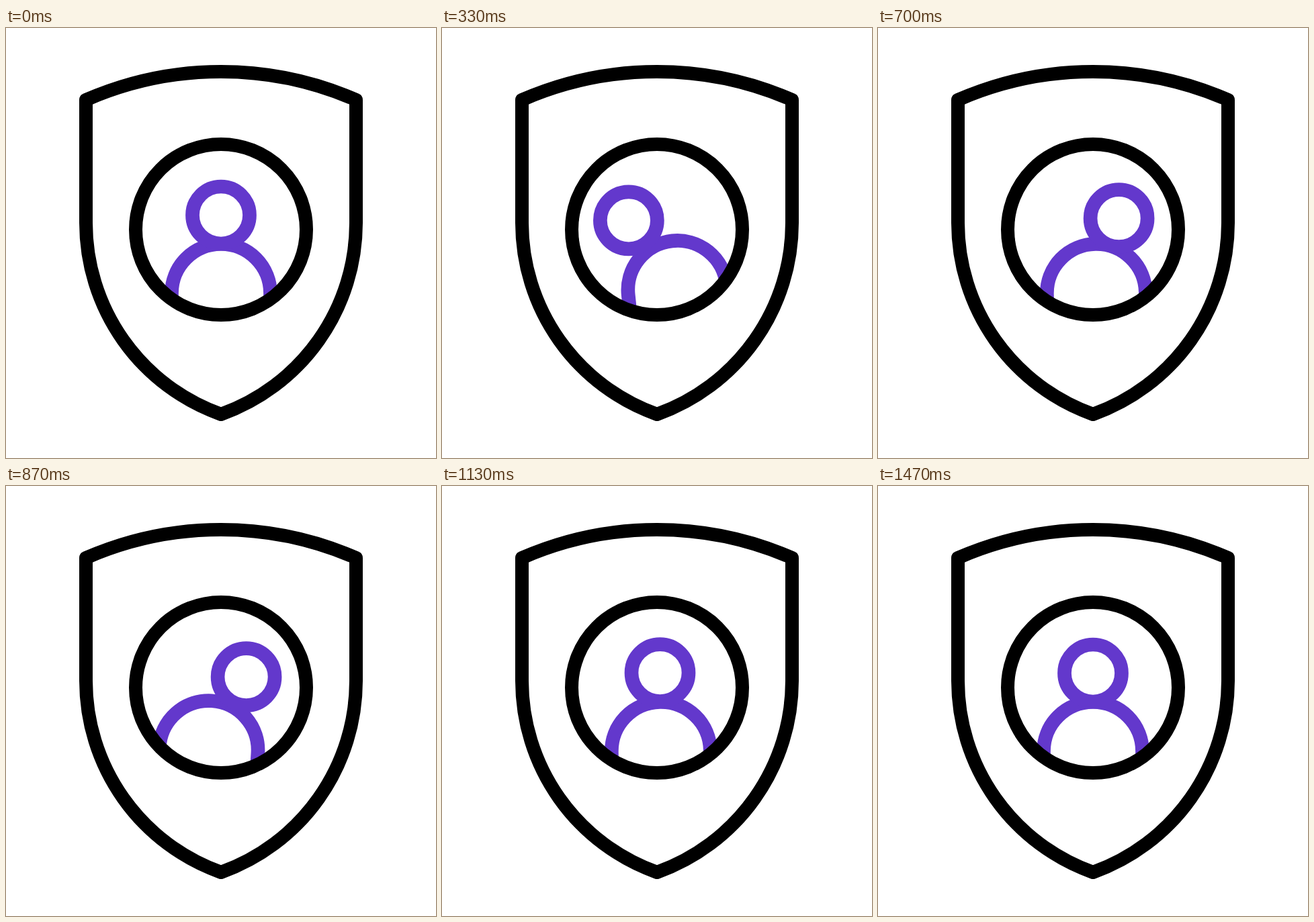
An HTML page for the animation above (1670 ms loop, 640 px wide and 640 px high).

```html
<!DOCTYPE html>
<html lang="en">
<head>
<meta charset="utf-8">
<title>Shield with profile</title>
<style>
  html, body { margin: 0; width: 100%; height: 100%; overflow: hidden; background: #fff; }
  svg { display: block; width: 100vw; height: 100vh; fill: none; stroke-width: 20; }
  .frame { stroke: #000; stroke-linejoin: round; }
  .person { stroke: #6338cc; stroke-width: 20.7; }
</style>
</head>
<body>
<svg viewBox="0 0 640 640">
  <clipPath id="window"><circle cx="320" cy="300" r="122"/></clipPath>
  <g class="person" clip-path="url(#window)">
    <path id="body" d="M-73.5 60V0A73.5 73.5 0 0 1 73.5 0V60"/>
    <circle id="head" r="42.5"/>
  </g>
  <g class="frame">
    <circle cx="320" cy="300" r="127"/>
    <path d="M119 107A502 502 0 0 1 521 107V290A302.6 302.6 0 0 1 320 575A302.6 302.6 0 0 1 119 290Z"/>
  </g>
</svg>
<script>
  const LOOP = 1670, STEP = 100 / 3, LAST = 44;
  const head = document.getElementById('head');
  const body = document.getElementById('body');

  // Sine-eased move of a given size, between two steps
  function move(k, from, to, size) {
    const p = Math.min(1, Math.max(0, (k - from) / (to - from)));
    return size * (1 - Math.cos(Math.PI * p)) / 2;
  }

  // The head swings left, right and back
  function headAt(k) {
    const x = move(k, 0, 11, -43) + move(k, 11, 22.7, 86) + move(k, 22.7, 37, -43);
    const lift = Math.max(0, Math.sin(Math.PI * k / 35));
    return [x, 0.0073 * x * x - 6.5 * lift];
  }

  // The body counters it a little later, overshoots and settles
  function bodyAt(k) {
    const x = move(k, 0, 13.5, 36) + move(k, 13.5, 27.5, -56)
            + move(k, 27.5, 35, 27) + move(k, 35, LAST, -7);
    return [x, -0.0055 * x * x];
  }

  function draw(time) {
    const k = Math.min(LAST, Math.floor((time % LOOP + 5) / STEP));
    const [hx, hy] = headAt(k), [bx, by] = bodyAt(k);
    head.setAttribute('transform', `translate(${320 + hx} ${278.5 + hy})`);
    body.setAttribute('transform', `translate(${320 + bx} ${395 + by}) rotate(${-0.2 * bx})`);
  }

  const start = performance.now();
  function tick() {
    draw(performance.now() - start);
    requestAnimationFrame(tick);
  }
  tick();
</script>
</body>
</html>
```
